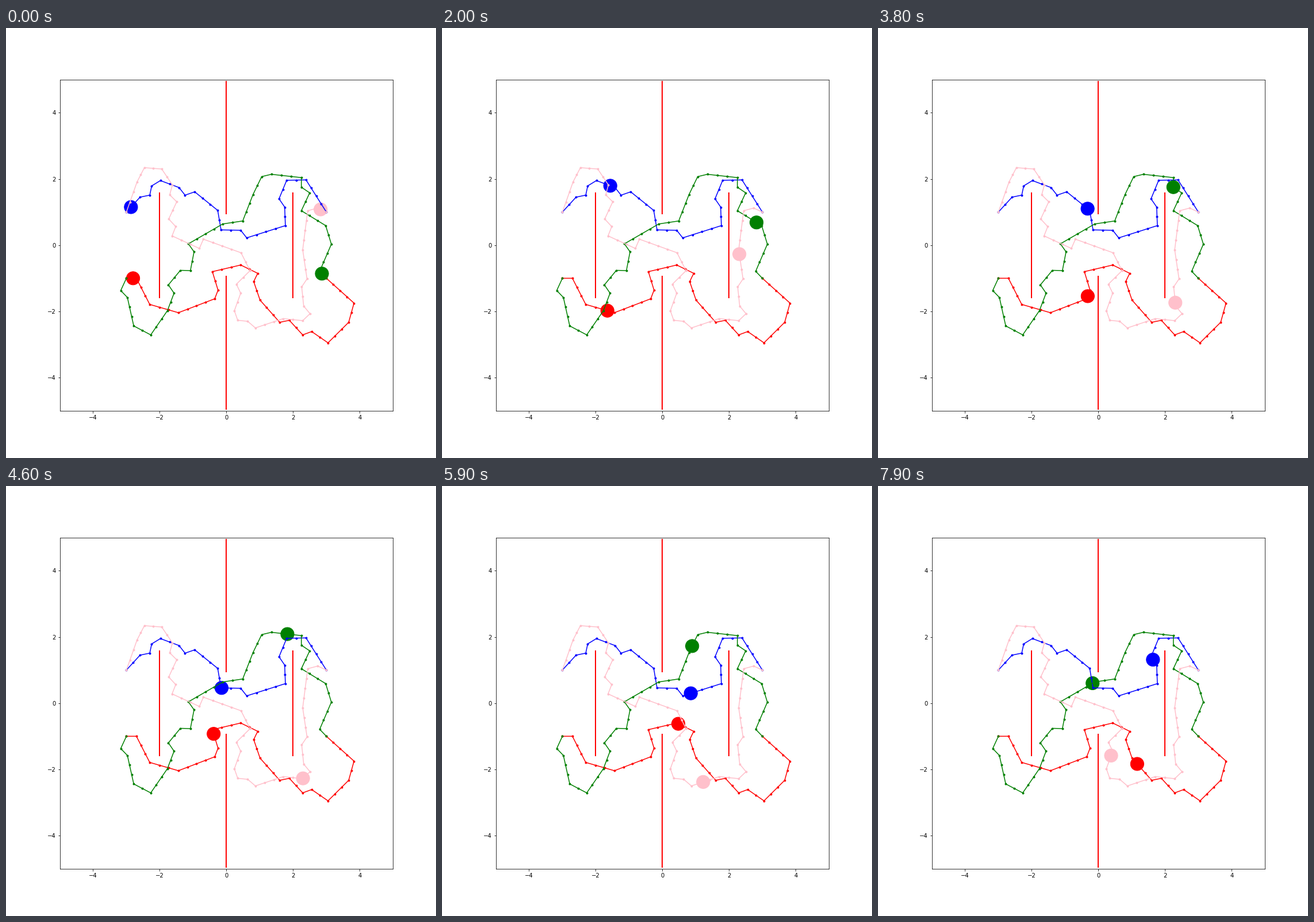
Animation, 748 px wide and 748 px high, one loop 8000 ms. Source, as a matplotlib script:

```python
import numpy as np
import matplotlib.pyplot as plt
from matplotlib.animation import FuncAnimation
from matplotlib.patches import Circle

FRAMES, INTERVAL = 80, 100
STEP = 0.3        # distance between neighbouring waypoints
START = 2 / 3     # waypoints already covered when the loop begins

# Each agent: colour, waypoints covered per tick, corners of its route
AGENTS = [
    ("red", 0.280, [
        (-3, -1), (-2.7, -1), (-2.3, -1.79), (-1.44, -2.04), (-.35, -1.62),
        (-.25, -1.36), (-.42, -.8), (.43, -.6), (.94, -.85), (.82, -1.1),
        (1.01, -1.66), (1.6, -2.33), (1.89, -2.27), (2.29, -2.71),
        (2.56, -2.61), (3.05, -2.95), (3.67, -2.33), (3.83, -1.75), (3, -1)]),
    ("blue", 0.291, [
        (-3, 1), (-2.59, 1.45), (-2.3, 1.51), (-2.24, 1.79), (-1.98, 1.95),
        (-1.42, 1.74), (-1.24, 1.51), (-.95, 1.61), (-.26, 1.05), (-.16, .46),
        (.43, .45), (.61, .22), (1.77, .59), (1.75, 1.15), (1.58, 1.4),
        (1.81, 1.96), (2.39, 1.97), (3, 1)]),
    ("green", 0.2985, [
        (3, -1), (2.8, -.79), (3.15, .03), (2.98, .59), (2.25, 1.04),
        (2.5, 1.58), (2.25, 1.75), (2.25, 2.04), (1.35, 2.14), (1.06, 2.07),
        (.8, 1.53), (.49, .73), (-.11, .64), (-1.14, .04), (-.97, -.2),
        (-1.08, -.77), (-1.38, -.76), (-1.74, -1.2), (-1.57, -1.45),
        (-1.77, -1.98), (-2.27, -2.71), (-2.78, -2.44), (-2.97, -1.58),
        (-3.17, -1.37), (-3, -1)]),
    ("pink", 0.289, [
        (3, 1), (2.74, 1.12), (2.44, 1.04), (2.29, -.14), (2.42, -1.02),
        (2.26, -1.26), (2.32, -1.84), (2.51, -2.07), (2.29, -2.28),
        (1.7, -2.22), (.87, -2.5), (.64, -2.3), (.34, -2.27), (.24, -1.98),
        (.43, -1.45), (.3, -1.18), (.71, -.77), (.44, -.23), (-.69, .18),
        (-.81, -.1), (-1.63, .28), (-1.52, .56), (-1.73, .79), (-1.49, 1.31),
        (-1.7, 1.52), (-1.62, 1.82), (-1.94, 2.3), (-2.46, 2.34),
        (-2.68, 1.91), (-3, 1)]),
]


def waypoints(corners):
    """Split every leg of a route into equal steps of about STEP."""
    corners = np.array(corners, float)
    pts = [corners[:1]]
    for a, b in zip(corners, corners[1:]):
        n = max(1, round(np.hypot(*(b - a)) / STEP))
        pts.append(np.linspace(a, b, n + 1)[1:])
    return np.vstack(pts)


def position(path, s):
    """Point at a fractional waypoint number."""
    knots = np.arange(len(path))
    return np.interp(s, knots, path[:, 0]), np.interp(s, knots, path[:, 1])


fig, ax = plt.subplots(figsize=(748 / 72, 748 / 72), dpi=72)
ax.set(xlim=(-5, 5), ylim=(-5, 5),
       xticks=range(-4, 5, 2), yticks=range(-4, 5, 2))

for x, lo, hi in [(-2, -1.58, 1.58), (2, -1.58, 1.58),
                  (0, 0.95, 4.95), (0, -4.95, -0.95)]:
    ax.plot([x, x], [lo, hi], color="red", lw=2)

movers = []
for color, rate, corners in AGENTS:
    path = waypoints(corners)
    ax.plot(*path.T, marker=".", color=color, lw=1.5)
    disc = ax.add_patch(Circle(position(path, START), 0.2, color=color))
    movers.append((disc, path, rate))


def update(i):
    for disc, path, rate in movers:
        disc.center = position(path, START + rate * i)
    return [m[0] for m in movers]


anim = FuncAnimation(fig, update, frames=FRAMES, interval=INTERVAL,
                     repeat=True, repeat_delay=0, blit=False)
plt.show()
```
